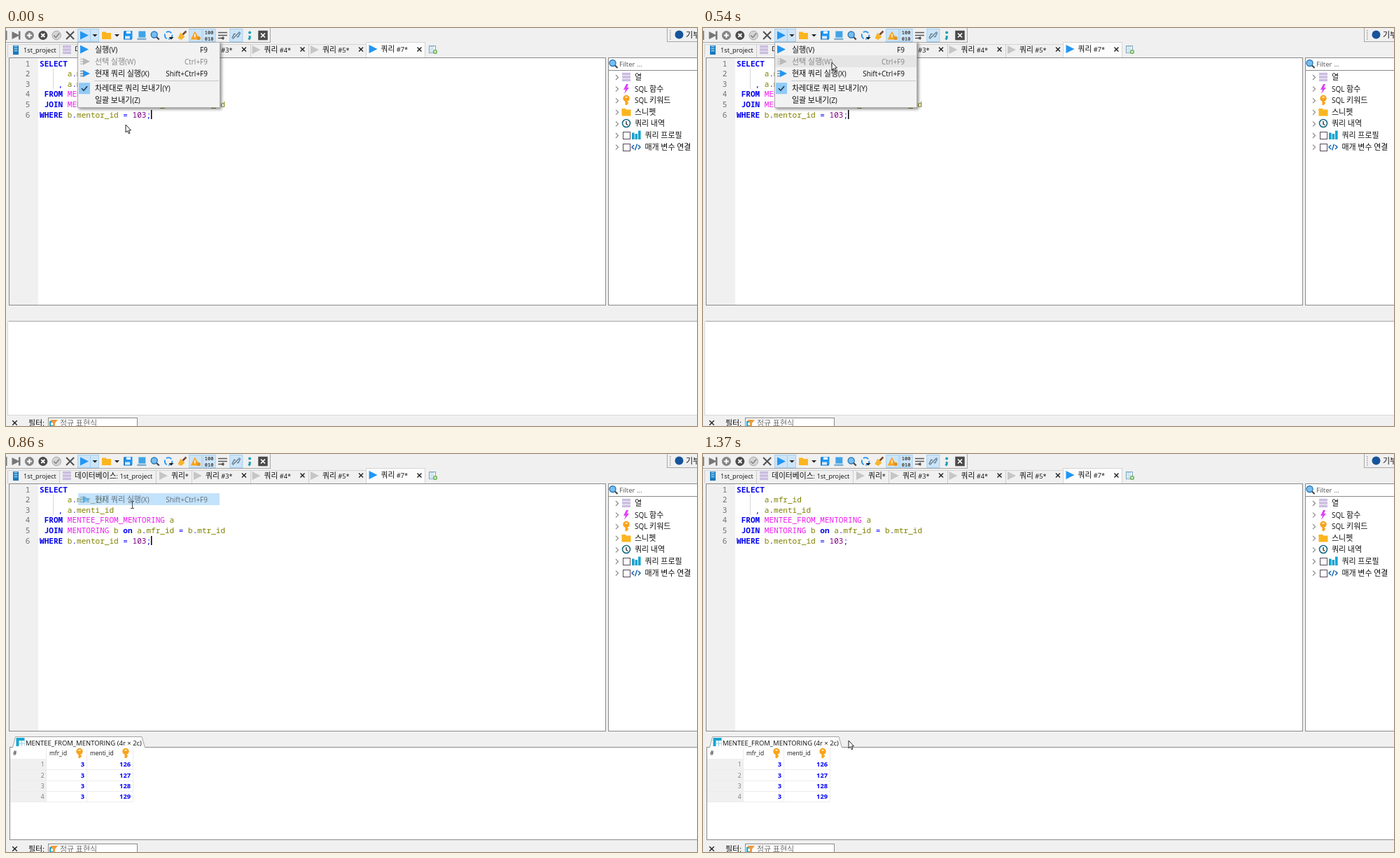
Recreate the animation shown at these times as an HTML page with a canvas. Size 987 by 568 pixels, loop 1.5 s.

```html
<!DOCTYPE html>
<html lang="ko">
<head>
<meta charset="utf-8">
<title>Query run</title>
<style>
html, body { margin: 0; width: 100%; height: 100%; overflow: hidden; background: #f0f0f0; }
canvas { display: block; }
</style>
</head>
<body>
<canvas id="stage" width="987" height="568"></canvas>
<script>
const canvas = document.getElementById('stage'), g = canvas.getContext('2d');
const W = canvas.width, H = canvas.height;
const LOOP = 1500, MENU_CLOSE = 700, FADE = 350, RESULT_AT = 840, CARET_OFF = 1240;
const LATIN = '"Open Sans", "Noto Sans", sans-serif';
const HANGUL = '"Noto Sans CJK KR", "Noto Sans CJK", sans-serif';
const MONO = '"Noto Sans Mono", "DejaVu Sans Mono", monospace';
const BG = '#f0f0f0', INK = '#111', DARK = '#4a4a4a', MID = '#858585', PALE = '#c6c6c6', EDGE = '#8a8a8a';
const BLUE = '#2196f3', PICK = '#91c9f7', GOLD = '#fbb51e', TEAL = '#16a5d0', LILAC = '#cabde0';

function rect(x, y, w, h, color) {
  g.fillStyle = color;
  g.fillRect(x, y, w, h);
}
const box = (size, color, h = size) => rect(-size / 2, -h / 2, size, h, color);
function panel(x, y, w, h, edge, fill) {
  rect(x, y, w, h, edge);
  rect(x + 1, y + 1, w - 2, h - 2, fill);
}
function trace(points) {
  g.beginPath();
  for (let i = 0; i < points.length; i += 2) g.lineTo(points[i], points[i + 1]);
}
function poly(color, ...points) {
  trace(points);
  g.fillStyle = color;
  g.fill();
}
function line(color, width, ...points) {
  trace(points);
  g.strokeStyle = color;
  g.lineWidth = width;
  g.stroke();
}
function disc(r, color) {
  g.beginPath();
  g.arc(0, 0, r, 0, 7);
  g.fillStyle = color;
  g.fill();
}
function ring(r, color, width) {
  g.beginPath();
  g.arc(0, 0, r, 0, 7);
  g.strokeStyle = color;
  g.lineWidth = width;
  g.stroke();
}
// Draws a shape whose own centre is the origin.
function at(x, y, draw, ...args) {
  g.save();
  g.translate(x, y);
  draw(...args);
  g.restore();
}
function text(str, x, y, font, color, align = 'left') {
  g.font = font;
  g.fillStyle = color;
  g.textAlign = align;
  g.fillText(str, x, y);
}
// Hangul and Latin runs use different faces and sizes.
function label(str, x, y, color = INK, latin = 10, hangul = 11) {
  for (const run of str.match(/[가-힣]+|[^가-힣]+/g)) {
    const font = /[가-힣]/.test(run) ? `${hangul}px ${HANGUL}` : `${latin}px ${LATIN}`;
    text(run, x, y, font, color);
    x += g.measureText(run).width;
  }
}

function cross(r, color, width) {
  line(color, width, -r, -r, r, r);
  line(color, width, -r, r, r, -r);
}
function plus(r, color, width) {
  line(color, width, -r, 0, r, 0);
  line(color, width, 0, -r, 0, r);
}
const check = color => line(color, 1.5, -4, 0, -1, 3, 4, -3);
const play = (color, r = 6) => poly(color, -r, -r, r, 0, -r, r);
const drop = () => poly('#222', -3.5, -1.5, 3.5, -1.5, 0, 2);
function bars(w, h, step, color) {
  for (let i = -1; i <= 1; i++) rect(-w / 2, i * step - h / 2, w, h, color);
}
const stack = () => bars(12, 3.5, 4.4, LILAC);
function folder() {
  rect(-6.5, -5, 6, 3, GOLD);
  rect(-6.5, -3.5, 13, 9, GOLD);
}
function key() {
  rect(-1.5, -2, 3, 9, '#f9a31a');
  rect(0, 3, 3, 2, '#f9a31a');
  at(0, -2.5, disc, 4.7, '#f9a31a');
  rect(-1.5, -5, 3, 1.5, '#fff');
}
function lens() {
  line('#444', 2.2, 2, 2, 6, 6);
  at(-1, -1, disc, 4.3, '#79bdf0');
  at(-1, -1, ring, 4.5, '#2878b8', 1.4);
}
function runPart(color, lines) {
  at(-3.5, 0, bars, 5, 1.5, 3.5, lines);
  at(3, 0, play, color, 5);
}
function bolt() {
  poly('#e040fb', 0, -7, 3, -7, 1, -2, 4, -2, -3, 7, -1, 1, -4, 1);
}
function clock() {
  ring(5.5, '#176b87', 1.6);
  line('#222', 1.3, 0, -3, 0, 1, 2, 2.5);
}
function chart() {
  for (const i of [0, 1, 2]) {
    const h = 8 + 3 * (i - 1) * (i - .5);
    rect(8 + i * 4.5, 6 - h, 3.6, h, TEAL);
  }
}
function codeMark() {
  for (const side of [-1, 1]) line('#1767b0', 1.5, 14 + side * 3, -3, 14 + side * 6, 0, 14 + side * 3, 3);
  line('#1767b0', 1.4, 15.5, -4.5, 12.5, 4.5);
}
const checkable = mark => () => {
  panel(-5, -5, 11, 11, '#59475a', '#fff');
  mark();
};
function tableMark() {
  box(12, TEAL);
  rect(-2, -2, 8, 8, '#fff');
  at(2, 2, plus, 4, '#8fd0ea', 1);
}

function badge(r, color, mark) {
  disc(r, color);
  mark();
}
const leftTools = [
  () => { play('#777', 5.5); rect(4, -6, 2.5, 12, '#777'); },
  () => badge(6.5, MID, () => plus(3.5, '#fff', 2)),
  () => badge(6.5, DARK, () => cross(2.5, '#fff', 1.8)),
  () => badge(6.3, '#d4d4d4', () => { ring(6.3, '#a9a9a9', 1); check('#808080'); }),
  () => cross(5.5, '#505050', 2)
];
function pressed(w = 19) { panel(-w / 2, -9.5, w, 19, '#a4d0f2', '#cce4f7'); }
function digits() {
  pressed();
  ['100', '010'].forEach((s, i) => text(s, 0, -1.5 + i * 8.5, `bold 7px ${MONO}`, DARK, 'center'));
}
const rightTools = [
  () => { box(12, '#1976c5'); at(1, -1, box, 11, BLUE); rect(-2, -6, 6, 3.5, '#fff'); rect(-4, 1, 7, 4, '#d7ecfb'); },
  () => { rect(-4, -6, 10, 9, '#3fa4e8'); rect(-6, 4, 13, 2.5, '#7fafd2'); },
  lens,
  () => { g.setLineDash([8, 2.5]); ring(5.3, BLUE, 1.8); at(4, 4, drop); },
  () => { line('#7a4a2a', 2.5, 1, -1, 6, -6); poly('#f8b52c', -2, -4, 4, 2, -1, 6.5, -6, 4); },
  () => { pressed(); poly('#f9a31a', -1, -6, 6, 6, -7, 6); rect(-1.7, -2, 1.5, 5, '#fff'); at(4.5, 4, disc, 2.6, '#e39225'); },
  digits,
  () => { for (const y of [-4, 0, 4]) line('#555', 1.5, -6.5, y, 6.5 - Math.max(y, 0), y); at(-1, 4, play, '#555', -2.5); },
  () => { pressed(); for (const s of [-1, 1]) line('#617d91', 1.4, s * 6, s * -4, s * 3, s * 2, s, s * 2); line('#617d91', 1.4, -5, 5, 5, -5); },
  () => { at(0, -4, disc, 2, '#18a0b5'); line('#18a0b5', 3, 0, .5, 0, 4, -1.5, 6); }
];
function toolbar(t) {
  const mid = 10.5;
  panel(-1, -1, 379, 22, '#a8a8a8', BG);
  rect(0, 4, 1.5, 13, '#777');
  leftTools.forEach((icon, i) => at(14 + i * 19.4, mid, icon));
  at(117.5, mid, pressed, 31);
  rect(120, 1, 1, 19, '#a4d0f2');
  at(112, mid, play, BLUE);
  at(143.5, mid, folder);
  for (const x of [127, 158.5]) at(x, mid, drop);
  rightTools.forEach((icon, i) => at(174 + i * 19.35, mid, icon));
  const busy = t >= MENU_CLOSE && t < RESULT_AT;
  at(367, mid, () => { box(13.5, busy ? '#ee4035' : DARK); cross(3, '#fff', 1.7); });

  panel(944, -1, 50, 21, '#a8a8a8', BG);
  for (let y = 3; y < 17; y += 3) rect(948, y, 1.5, 1.5, '#a0a0a0');
  at(961.5, 9.5, disc, 6, '#17539b');
  label('기부', 971, 13.5);
}

function tabs() {
  const name = (str, x, y = 35) => label(str, x, y, INK, 9.2, 10.8);
  rect(2, 23, 512, 1, '#d5d5d5');
  for (const x of [2, 76, 214]) rect(x, 23, 1, 19, '#cecece');
  panel(514, 20, 85, 24, '#d5d5d5', '#fcfcfc');
  at(14, 31.5, () => { box(8, '#1979bd', 13); at(0, -2, bars, 5, 1.5, 3, '#8fd0f4'); });
  at(87, 31, stack);
  name('1st_project', 25);
  name('데이터베이스: 1st_project', 98);
  at(225, 31, play, PALE);
  name('쿼리*', 236);
  [3, 4, 5, 7].forEach((n, i) => {
    const x = 268 + i * 83.5, active = n === 7;
    if (!active) rect(Math.round(x - 3), 23, 1, 19, '#cecece');
    at(x + 6, active ? 30 : 31, play, active ? BLUE : PALE);
    name(`쿼리 #${n}*`, x + 17, active ? 34 : 35);
    at(x + 72, 30.5, cross, 3, '#222', 1.4);
  });
  panel(604, 25, 10, 11, '#7ba3bd', '#fff');
  at(608.5, 30, bars, 6, 1, 3, '#7bb5d8');
  at(613, 34, badge, 3, '#5aac44', () => plus(2, '#fff', 1));
}

const SQL = [
  'SELECT',
  '      a.mfr_id',
  '    , a.menti_id',
  ' FROM MENTEE_FROM_MENTORING a',
  ' JOIN MENTORING b on a.mfr_id = b.mtr_id',
  'WHERE b.mentor_id = 103;'
];
function tokenStyle(word) {
  if (/^(SELECT|FROM|JOIN|WHERE|on)$/.test(word)) return ['bold ', '#0000f0'];
  if (/^[A-Z]/.test(word)) return ['', '#ee1cee'];
  if (/^\d/.test(word)) return ['', '#800080'];
  return ['', /^\w/.test(word) ? '#808000' : '#0000ff'];
}
function editor(t) {
  const font = `11.05px ${MONO}`;
  panel(4, 42, 853, 354, EDGE, '#fff');
  rect(5, 43, 41, 352, BG);
  rect(67, 58, 1, 29, '#d8d8d8');
  g.font = font;
  const advance = g.measureText('0').width;
  SQL.forEach((row, i) => {
    const y = 54.6 + i * 14.6;
    text(i + 1, 34.5, y, font, '#707070', 'right');
    for (const m of row.matchAll(/\w+|[^\w\s]/g)) {
      const [weight, color] = tokenStyle(m[0]);
      text(m[0], 48 + m.index * advance, y, weight + font, color);
    }
  });
  if (t < CARET_OFF) rect(207, 117, 1.5, 13, '#000');
}

const TREE = [
  ['열', stack], ['SQL 함수', bolt], ['SQL 키워드', key], ['스니펫', folder], ['쿼리 내역', clock],
  ['쿼리 프로필', checkable(chart)], ['매개 변수 연결', checkable(codeMark)]
];
function sidebar() {
  panel(860, 42, 130, 354, EDGE, '#fff');
  rect(860, 60, W - 860, 1, EDGE);
  at(867.5, 51, lens);
  label('Filter ...', 876, 54.5, '#555', 9.6);
  TREE.forEach(([name, icon], i) => {
    const y = 70 + i * 16.6;
    at(873, y + .5, line, '#888', 1.2, -2, -3.5, 1.5, 0, -2, 3.5);
    at(886, Math.round(y), icon);
    label(name, i > 4 ? 912.5 : 898, y + 4);
  });
}

function results(t) {
  if (t < RESULT_AT) {
    panel(2, 418, W, 135, '#d9d9d9', '#fff');
    rect(4, 418, W, 1, '#a5a5a5');
    return;
  }
  panel(5, 418, W, 133, EDGE, '#fff');
  const outline = [9.5, 419, 13.5, 403.5, 194, 403.5, 198.5, 419];
  poly('#fcfcfc', ...outline);
  line('#a5a5a5', 1, ...outline);
  at(20.5, 411, tableMark);
  label('MENTEE_FROM_MENTORING (4r × 2c)', 28, 415.5, INK, 9.5);
  rect(6, 435, 51, 61, BG);
  label('#', 10, 430, INK, 8.4);
  ['mfr_id', 'menti_id'].forEach((name, i) => {
    label(name, 62 + i * 58, 430, INK, 8.4);
    at(105 + i * 66, 427, key);
  });
  for (const x of [57, 115, 181]) rect(x, 420, 1, 76, '#ececec');
  for (let i = 0; i < 4; i++) {
    const y = 446.3 + i * 15.3, bold = `bold 9.3px ${LATIN}`;
    rect(6, Math.round(y + 4), 175, 1, '#ececec');
    text(i + 1, 54.5, y, `8.5px ${LATIN}`, '#777', 'right');
    text(3, 112, y, bold, '#0000ff', 'right');
    text(126 + i, 178, y, bold, '#0000ff', 'right');
  }
}

function filterBar() {
  at(12.5, 563.5, cross, 3.3, '#222', 1.4);
  label('필터:', 32, H);
  panel(60, 556, 128, 20, EDGE, '#fff');
  at(66, 565, () => { box(8, TEAL); box(4, '#fff'); });
  poly('#f29a3d', 63, 559, 74, 559, 70, 564, 70, H, 67, H, 67, 564);
  label('정규 표현식', 77, H, '#707070');
}

const ITEMS = [
  { name: '실행(V)', keys: 'F9', icon: () => play(BLUE) },
  { name: '선택 실행(W)', keys: 'Ctrl+F9', off: true, icon: () => runPart('#b8b8b8', '#c4c4c4') },
  { name: '현재 쿼리 실행(X)', keys: 'Shift+Ctrl+F9', icon: () => runPart(BLUE, '#708fa8') },
  { name: '차레대로 쿼리 보내기(Y)', icon: () => { box(16, PICK); check('#17324a'); } },
  { name: '일괄 보내기(Z)' }
];
const ROW = 17.2, rowTop = i => 22 + i * ROW + (i > 2 ? 4 : 0);
function menuRow(i, hover) {
  const { name, keys, off, icon } = ITEMS[i], top = rowTop(i), mid = top + ROW / 2;
  const color = off ? MID : INK;
  if (hover) rect(103, Math.round(top), 202, 17, off ? '#e5e5e5' : PICK);
  if (icon) at(112, mid, icon);
  label(name, 127, mid + 4, color);
  if (keys) text(keys, 288, mid + 4, `10px ${LATIN}`, color, 'right');
}
function menu(pointerY) {
  g.save();
  g.shadowColor = 'rgba(0,0,0,.45)';
  g.shadowBlur = 4;
  g.shadowOffsetX = g.shadowOffsetY = 2;
  rect(102, 20, 204, 94, '#b0b0b0');
  g.restore();
  panel(102, 20, 204, 94, '#b0b0b0', '#f2f2f2');
  rect(126, 75, 178, 1, '#c8c8c8');
  ITEMS.forEach((_, i) => menuRow(i, pointerY >= rowTop(i) && pointerY < rowTop(i) + ROW));
}

const easeIn = u => u * u, easeOut = u => u * (2 - u), smooth = u => u * u * (3 - 2 * u);
// Each move ends at (x, y); equal neighbours are rests.
const MOVES = [
  { from: 0, to: 30, x: 171, y: 138 },
  { from: 30, to: 100, x: 171, y: 146, ease: smooth },
  { from: 100, to: 540, x: 184, y: 49, ease: easeOut },
  { from: 570, to: 770, x: 182, y: 61, ease: easeOut },
  { from: 770, to: 860, x: 180, y: 72, ease: easeIn },
  { from: 860, to: 1040, x: 195, y: 163, ease: smooth },
  { from: 1120, to: 1370, x: 208, y: 409, ease: smooth }
];
function pointerAt(t) {
  let { x, y } = MOVES[0];
  for (const m of MOVES.slice(1)) {
    const k = m.ease(Math.min(1, Math.max(0, (t - m.from) / (m.to - m.from))));
    x += (m.x - x) * k;
    y += (m.y - y) * k;
  }
  return [Math.round(x), Math.round(y)];
}
function arrow() {
  trace([0, 0, 0, 11, 2.5, 8.7, 4.3, 12.8, 6, 12, 4.3, 8, 7.5, 8]);
  g.closePath();
  g.fillStyle = '#fff';
  g.fill();
  g.strokeStyle = '#222';
  g.lineWidth = 1;
  g.stroke();
}
function beam() {
  rect(0, -5, 1, 11, DARK);
  for (const y of [-5, 5]) rect(-2, y, 5, 1, DARK);
}

function draw(t) {
  rect(0, 0, W, H, BG);
  tabs();
  toolbar(t);
  editor(t);
  sidebar();
  results(t);
  filterBar();
  const [x, y] = pointerAt(t);
  if (t < MENU_CLOSE) {
    menu(y);
  } else if (t < MENU_CLOSE + FADE) {
    g.globalAlpha = 1 - (t - MENU_CLOSE) / FADE;
    menuRow(2, true);
    g.globalAlpha = 1;
  }
  at(x, y, t < MENU_CLOSE || y > 395 ? arrow : beam);
}

function tick() {
  draw(performance.now() % LOOP);
  requestAnimationFrame(tick);
}
tick();
</script>
</body>
</html>
```
